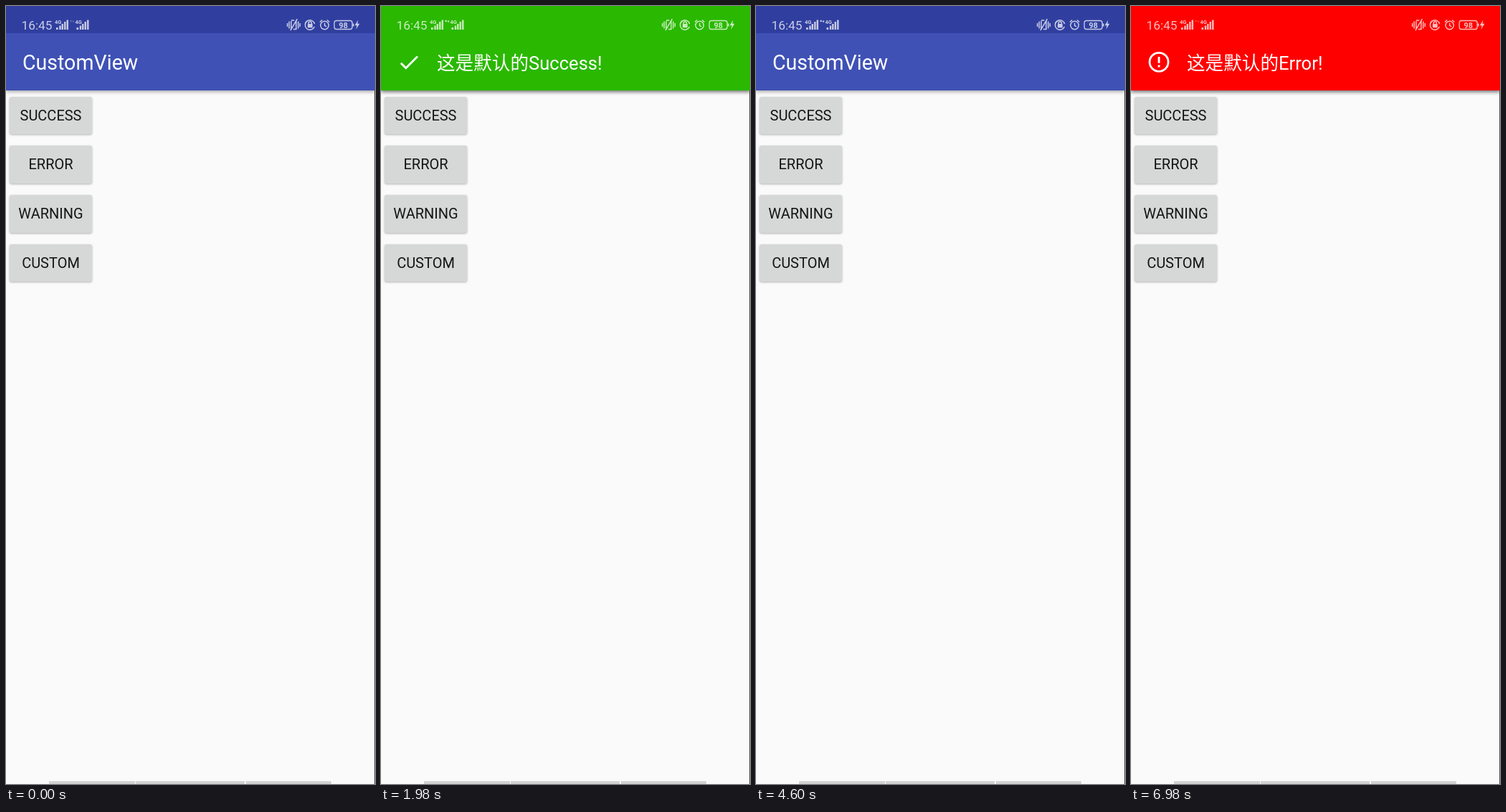
Write an HTML page that moves like this. It is 515 px wide and 1087 px high and loops after 8 s.

```html
<!DOCTYPE html>
<html lang="zh-CN">
<head>
<meta charset="utf-8">
<title>CustomView</title>
<style>
  html, body { margin: 0; width: 100%; height: 100%; overflow: hidden; }
  body { font-family: Roboto, "Noto Sans CJK SC", "Noto Sans CJK", sans-serif; }
  #stage { position: relative; width: 515px; height: 1087px; overflow: hidden; background: #fafafa; }
  #stage > * { position: absolute; }

  .bar { left: 0; top: 0; width: 515px; height: 118px; box-shadow: 0 2px 5px rgba(0, 0, 0, .32); }
  .toolbar { background: linear-gradient(#303f9f 38px, #3f51b5 38px); }
  .toolbar span { position: absolute; left: 22.9px; top: 58.5px; font-size: 28.6px; line-height: 40px; color: #fff; }

  .btn {
    left: 5px; width: 115px; height: 52.5px; border-radius: 3px; overflow: hidden;
    background: #d6d7d7; box-shadow: 0 1px 3px rgba(0, 0, 0, .3);
    font-size: 20px; line-height: 53px; text-align: center; color: #141414;
  }
  .btn i {
    position: absolute; left: -23px; top: -74px; width: 200px; height: 200px;
    border-radius: 50%; background: rgba(0, 0, 0, .1); transform: scale(0);
  }
  .btn b { position: relative; font-weight: 400; }

  .touch {
    box-sizing: border-box; width: 34px; height: 34px; border-radius: 50%;
    background: rgba(255, 255, 255, .64); border: 2px solid rgba(150, 158, 205, .55); opacity: 0;
  }
  .alert svg { position: absolute; left: 0; top: 0; }
  .alert text { font-size: 25.6px; fill: #fff; }
  .edge { right: 0; top: 118px; width: 1px; bottom: 0; background: #5a5a5a; }
  .nav { top: 1083px; height: 4px; background: #d2d2d2; }

  .anim { animation: 8s linear infinite both; }
  .ripple-ok { animation-name: ripple-ok; }
  .ripple-err { animation-name: ripple-err; }
  .touch-ok { animation-name: touch-ok; animation-timing-function: step-end; }
  .touch-err { animation-name: touch-err; animation-timing-function: step-end; }
  .ok { background: #2ab800; animation-name: slide-ok; }
  .err { background: #f00; animation-name: slide-err; }
  .data { animation-name: data; animation-timing-function: step-end; }

  @keyframes touch-ok { 0%, 16.75%, 100% { opacity: 0 } 14.875% { opacity: 1 } }
  @keyframes touch-err { 0%, 64.6%, 100% { opacity: 0 } 63.75% { opacity: 1 } }
  @keyframes ripple-ok {
    0%, 16.75% { transform: scale(0); opacity: 1 }
    19% { transform: none }
    19.875% { opacity: 1 }
    24.75%, 100% { transform: none; opacity: 0 }
  }
  @keyframes ripple-err {
    0%, 64.375% { transform: scale(0); opacity: 1 }
    66.625% { transform: none }
    67.5% { opacity: 1 }
    72.375%, 100% { transform: none; opacity: 0 }
  }
  /* decelerate in, accelerate out, 200 ms each */
  @keyframes slide-ok {
    0% { transform: translateY(-118px); visibility: hidden }
    17.375% { transform: translateY(-118px); visibility: hidden; animation-timing-function: cubic-bezier(.333, .667, .667, 1) }
    19.875% { transform: none; visibility: visible }
    54.71% { transform: none; visibility: visible; animation-timing-function: cubic-bezier(.333, 0, .667, .333) }
    57.21%, 100% { transform: translateY(-118px); visibility: hidden }
  }
  @keyframes slide-err {
    0% { transform: translateY(-118px); visibility: hidden }
    65.025% { transform: translateY(-118px); visibility: hidden; animation-timing-function: cubic-bezier(.333, .667, .667, 1) }
    67.525%, 100% { transform: none; visibility: visible }
  }
  @keyframes data {
    0%, 43.25%, 81% { opacity: .3 }
    18.25%, 55.75% { opacity: 1 }
    100% { opacity: .3 }
  }
</style>
</head>
<body>
<div id="stage">
  <div class="bar toolbar"><span>CustomView</span></div>

  <div class="btn" style="top:126.5px"><i class="anim ripple-ok"></i><b>SUCCESS</b></div>
  <div class="btn" style="top:195.2px"><i class="anim ripple-err"></i><b>ERROR</b></div>
  <div class="btn" style="top:264px"><b>WARNING</b></div>
  <div class="btn" style="top:332.7px"><b>CUSTOM</b></div>

  <div class="edge"></div>
  <div class="nav" style="left:60px;width:120px"></div>
  <div class="nav" style="left:181px;width:152px"></div>
  <div class="nav" style="left:335px;width:119px"></div>

  <div class="bar alert ok anim">
    <svg width="515" height="118">
      <path transform="translate(21.9 61.6) scale(1.43)" fill="#fff" d="M9 16.2L4.8 12l-1.4 1.4L9 19 21 7l-1.4-1.4z"/>
      <text x="78" y="88.5">这是默认的Success!</text>
    </svg>
  </div>
  <div class="bar alert err anim">
    <svg width="515" height="118">
      <circle cx="39" cy="78.3" r="13" fill="none" stroke="#fff" stroke-width="2.8"/>
      <path d="M39 71v8.7M39 82.6v2.9" stroke="#fff" stroke-width="2.9"/>
      <text x="78" y="88.5">这是默认的Error!</text>
    </svg>
  </div>

  <div class="touch touch-ok anim" style="left:65px;top:135px"></div>
  <div class="touch touch-err anim" style="left:62px;top:207px"></div>

  <svg width="515" height="38" style="left:0;top:0" fill="#fff" opacity=".74">
    <text x="21.5" y="33" font-size="17.3">16:45</text>
    <defs>
      <g id="signal">
        <text x="68" y="25" font-size="7.5" font-weight="700">4G</text>
        <path d="M70 30h2.6v3H70zM74.3 27.5h2.4V33h-2.4zM77.6 25h2.4v8h-2.4zM81.1 22h2.4v11h-2.4zM84.6 19.5H87V33h-2.4z"/>
      </g>
    </defs>
    <use href="#signal"/>
    <use href="#signal" x="28.5"/>
    <path class="data anim" d="M89 22l1.7-3 1.6 3zM92.5 20.5h3.2l-1.6 3z"/>

    <g fill="none" stroke="#fff" stroke-width="1.5">
      <path d="M392.7 24v5M395.2 21.5v10M407.8 21.5v10M410.3 24v5M398 21v12M405 20v12.5h-4M398 20h4.5M406.5 18.2l-9.5 16"/>
      <path d="M430.2 29.5a6.7 6.7 0 1 1 .5-4.5M430.6 29l-3 3.4"/>
      <path d="M422.3 25.5v-1.6a2.1 2.1 0 0 1 4.2 0v1.6"/>
      <circle cx="444.7" cy="27" r="5.7"/>
      <path d="M444.7 23.7v3.6l2.7 1.5M438 22.5l3.3-3M451.4 22.5l-3.3-3"/>
      <rect x="458.2" y="20.5" width="25" height="12" rx="3" stroke-width="1.3"/>
    </g>
    <rect x="421" y="25" width="6.8" height="5.2" rx=".8"/>
    <rect x="484" y="24.5" width="1.6" height="4"/>
    <text x="470.7" y="30.6" font-size="11" font-weight="700" text-anchor="middle">98</text>
    <path d="M491.3 19.5l-4.5 7.8h2.9l-1.2 5.5 5-8h-3z"/>
  </svg>
</div>
</body>
</html>
```
